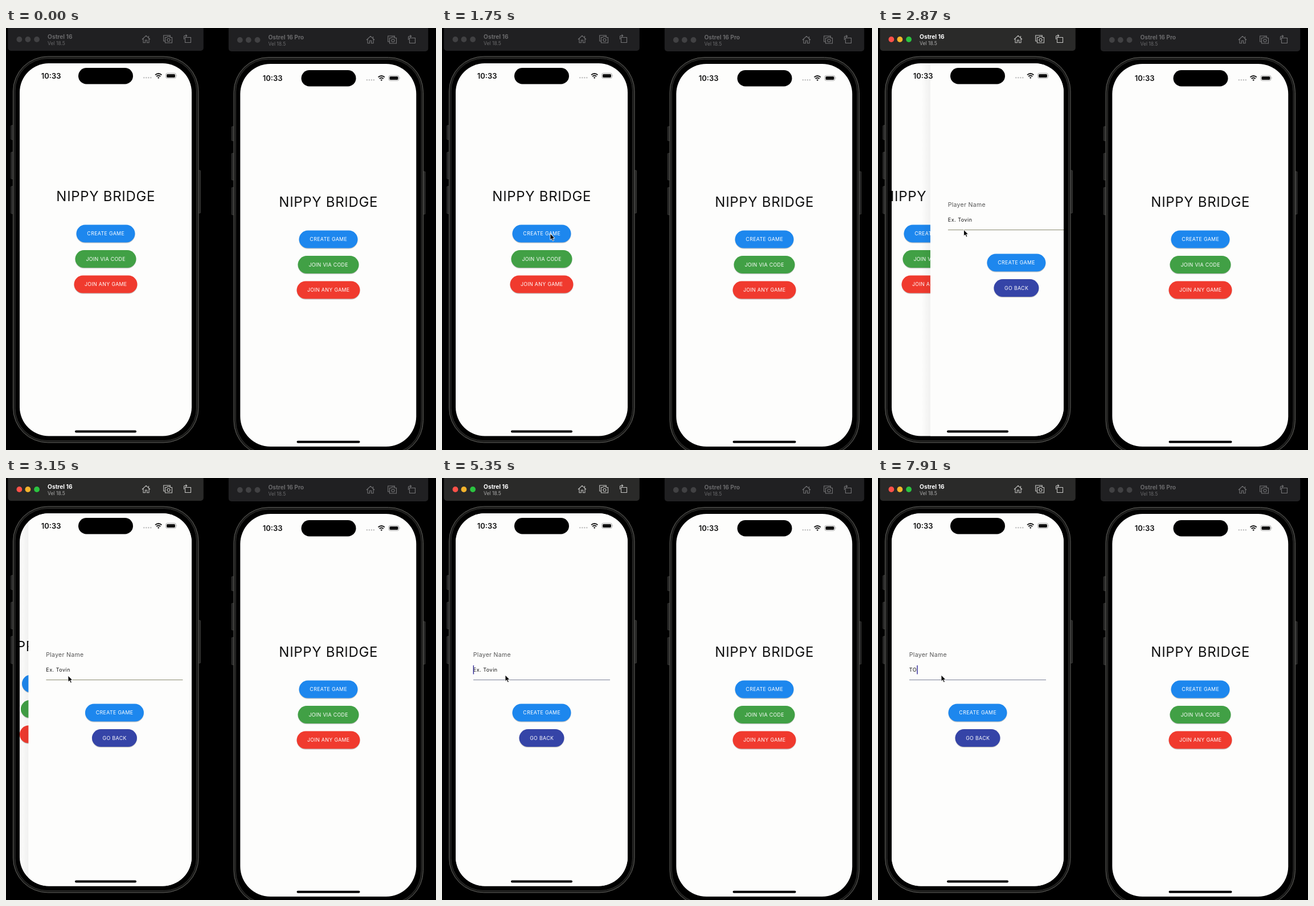
Recreate the animation shown at these times as an HTML page. Size 755 by 741 pixels, loop 8000 ms.

```html
<!DOCTYPE html>
<html lang="en">
<head>
<meta charset="utf-8">
<title>Card game on two handsets</title>
<style>
  html, body { margin: 0; width: 100%; height: 100%; overflow: hidden; background: #000; }
  svg { display: block; font-family: Inter, sans-serif; }
  text { white-space: pre; }
  .title { font-size: 24px; letter-spacing: .7px; text-anchor: middle; fill: #111; }
  .label { font-size: 8.8px; letter-spacing: .35px; text-anchor: middle; fill: #fff; }
  .clock { font-size: 13px; font-weight: 600; fill: #111; }
  .bar { fill: #202022; color: #747476; }
  .bar .name { font-size: 10.2px; font-weight: 700; fill: #69696b; }
  .bar .system { font-size: 8.5px; fill: #69696b; }
  .bar circle { fill: #414143; }
  .bar .icons { fill: none; stroke: currentColor; stroke-width: 1.1; }
  .bar.active { fill: #2a2a29; color: #c4c4c2; }
  .bar.active .name { fill: #fff; }
  .bar.active .system { fill: #aaa; }
  .bar.active circle:nth-of-type(1) { fill: #ff5149; }
  .bar.active circle:nth-of-type(2) { fill: #f5b32c; }
  .bar.active circle:nth-of-type(3) { fill: #2bc440; }
</style>
</head>
<body>
<svg id="stage" width="755" height="741" viewBox="0 0 755 741"></svg>
<script>
const PAPER = '#fdfdfc';
const WIDTH = 302;

const rect = (x, y, w, h, r, attrs) =>
  `<rect x="${x}" y="${y}" width="${w}" height="${h}" rx="${r}" ${attrs}/>`;

const button = (label, y, width, color) =>
  rect(175 - width / 2, y - 14.3, width, 31, 15.5, 'fill="#000" opacity=".22"') +
  rect(175 - width / 2, y - 15.4, width, 31, 15.5, `fill="${color}"`) +
  `<text class="label" x="175.2" y="${y + 3.2}">${label}</text>`;

const home = `
  <text class="title" x="175.3" y="303.8">NIPPY BRIDGE</text>
  ${button('CREATE GAME', 361, 103, '#1d87ee')}
  ${button('JOIN VIA CODE', 405.5, 107, '#41a045')}
  ${button('JOIN ANY GAME', 450, 111, '#f03a2e')}`;

const form = `
  ${rect(24, 62, WIDTH, 655, 0, `fill="${PAPER}"`)}
  <text x="54.8" y="314.4" font-size="10.5" letter-spacing=".3" fill="#555">Player Name</text>
  <text id="entry" x="54.8" y="340" font-size="9" letter-spacing=".5" fill="#111"></text>
  <path id="underline" d="M55 354.5H295"/>
  <rect id="caret" y="329" width="1.5" height="15.5" fill="#39329b"/>
  ${button('CREATE GAME', 412, 103, '#1d87ee')}
  ${button('GO BACK', 456.5, 79, '#3544a7')}`;

const status = `
  ${rect(127, 70, 96, 28.4, 14.2, 'fill="#000"')}
  <path d="M242.3 87.3h13" stroke="#bcbcbc" stroke-width="2.4" stroke-linecap="round" stroke-dasharray="0 4"/>
  <g fill="none" stroke="#111" stroke-width="1.9">
    <path d="M262 82.4q5.7-5 11.4 0M264.2 85q3.5-3 7 0"/>
    <path d="M267.7 89l-1.8-2q1.8-1.3 3.6 0z" fill="#111" stroke="none"/>
  </g>
  ${rect(280.5, 79.4, 18, 9, 2.8, 'fill="none" stroke="#aaa"')}
  ${rect(282, 80.9, 15, 6, 1.6, 'fill="#111"')}
  <path d="M299.6 82.3q1.6 1.5 0 3" fill="#aaa"/>`;

const icons = `
  <path d="M239 20l7-6.6 7 6.6M241 18.5v7.3h3.5v-4.5h3v4.5h3.5v-7.3M250.5 14v2.5"/>
  <path d="M279 23h-2.3V13h11.6v2.5M279.5 16.5h3l1-1.5h4l1 1.5h3v9.5h-12z"/>
  <path d="M314.5 16.5h10v9h-10zM312.5 20v-5q0-1.5 1.5-1.5h3.5M315.5 11.3l2.2 2.2-2.2 2.2"/>`;
const lens = '<ellipse cx="285.5" cy="21" rx="2.5" ry="2.5"/>';

const toolbar = (id, x, y, width, name, iconShift) => `
  <g id="${id}" class="bar" transform="translate(${x} ${y})">
    ${rect(0, -4, width, 44, 5, '')}
    ${[20, 35, 50.7].map(cx => `<circle cx="${cx}" cy="20" r="4.9"/>`).join('')}
    <text class="name" x="69.7" y="18.7">${name}</text>
    <text class="system" x="69.7" y="29.6">Vel 18.5</text>
    <g class="icons" transform="translate(${iconShift} 0)">${icons}${lens}</g>
  </g>`;

// Chassis, bezel and side keys around a screen of the given size.
const chassis = (x, y, w, h, keyTop) => {
  const key = (kx, ky, kh) => rect(kx, ky, 4, kh, 1, 'fill="#242424" stroke="#484846" stroke-width=".7"');
  return key(x - 3.2, keyTop, 25) + key(x - 3.2, keyTop + 47, 47) + key(x - 3.2, keyTop + 107, 48) +
    key(x + w - 1, keyTop + 79, 75) +
    rect(x + .5, y + .5, w - 1, h - 1, 61, 'fill="#191918" stroke="#63635f"') +
    rect(x + 4, y + 4, w - 8, h - 8, 57, 'fill="#000" stroke="#30302e"');
};

const stage = document.getElementById('stage');
stage.innerHTML = `
  <defs>
    <clipPath id="leftScreen">${rect(24, 62, WIDTH, 654.5, 51, '')}</clipPath>
    <linearGradient id="edge"><stop stop-opacity="0"/><stop offset="1" stop-opacity=".05"/></linearGradient>
  </defs>
  ${toolbar('leftBar', 3.4, 0, 343.4, 'Ostrel 16', -3.4)}
  ${chassis(12, 49.5, 326.5, 679, 171)}
  <g clip-path="url(#leftScreen)">
    ${rect(24, 62, WIDTH, 655, 0, `fill="${PAPER}"`)}
    <g id="home">${home}</g>
    <g id="form">${rect(8, 62, 16, 655, 0, 'fill="url(#edge)"')}${form}</g>
  </g>
  ${status}<text class="clock" x="61.7" y="88.8">10:33</text>
  ${rect(121, 706.4, 108, 4, 2, 'fill="#000"')}

  ${toolbar('rightBar', 390.8, 1, 350.5, 'Ostrel 16 Pro', 3.2)}
  ${chassis(399.5, 51, 333.5, 700, 173)}
  ${rect(411.3, 63, 309, 672, 53, `fill="${PAPER}"`)}
  <g transform="translate(391 10)">${home}</g>
  <g transform="translate(391.5 4)">${status}</g>
  <text class="clock" x="450.8" y="92.8">10:33</text>
  ${rect(510.5, 724.8, 111, 4, 2, 'fill="#000"')}

  <path id="pointer" d="M0 0V11.2L2.6 8.8 4.4 13 6.4 12.1 4.6 8.1H8Z"
    fill="#000" stroke="#fff" stroke-width=".9" stroke-linejoin="round"/>`;

const $ = id => document.getElementById(id);
const entry = $('entry'), underline = $('underline'), caret = $('caret'), pointer = $('pointer');
const move = (node, x, y = 0) => node.setAttribute('transform', `translate(${x} ${y})`);

const LOOP = 8000, ACTIVATE = 1900, PUSH = 2589, FOCUS = 4900;
const KEYS = [[7400, 'T'], [7750, 'TO']];

// Pointer stops: time, x, y
const STOPS = [
  [400, 380, 745], [800, 192, 305], [1100, 192, 305], [1700, 190, 361],
  [2650, 190, 361], [3100, 109, 347], [3200, 109, 347], [3450, 111, 346]
];

function pointerAt(t) {
  const next = STOPS.findIndex(stop => stop[0] > t);
  if (next < 0) return STOPS[STOPS.length - 1].slice(1);
  if (next === 0) return STOPS[0].slice(1);
  const [t0, x0, y0] = STOPS[next - 1], [t1, x1, y1] = STOPS[next];
  const p = (t - t0) / (t1 - t0), e = p * p * (3 - 2 * p);
  return [x0 + (x1 - x0) * e, y0 + (y1 - y0) * e];
}

function draw(t) {
  $('leftBar').classList.toggle('active', t >= ACTIVATE);

  // The new page decays into place; the old one leaves at a third of its speed.
  const remaining = t < PUSH ? 1 : Math.exp((PUSH - t) / 189);
  move($('form'), WIDTH * remaining);
  move($('home'), -WIDTH / 3 * (1 - remaining));
  $('form').style.display = t < PUSH ? 'none' : '';

  const typed = KEYS.filter(key => key[0] <= t).pop();
  entry.textContent = typed ? typed[1] : 'Ex. Tovin';
  const focused = t >= FOCUS;
  underline.setAttribute('stroke', focused ? '#7c8298' : '#8b8b70');
  caret.setAttribute('x', typed ? 54.8 + entry.getComputedTextLength() : 54.6);
  const sinceBlink = t - (typed ? typed[0] : FOCUS);
  caret.style.display = focused && sinceBlink % 1000 < 500 ? '' : 'none';

  move(pointer, ...pointerAt(t));
}

function frame() {
  draw(performance.now() % LOOP);
  requestAnimationFrame(frame);
}
frame();
</script>
</body>
</html>
```
